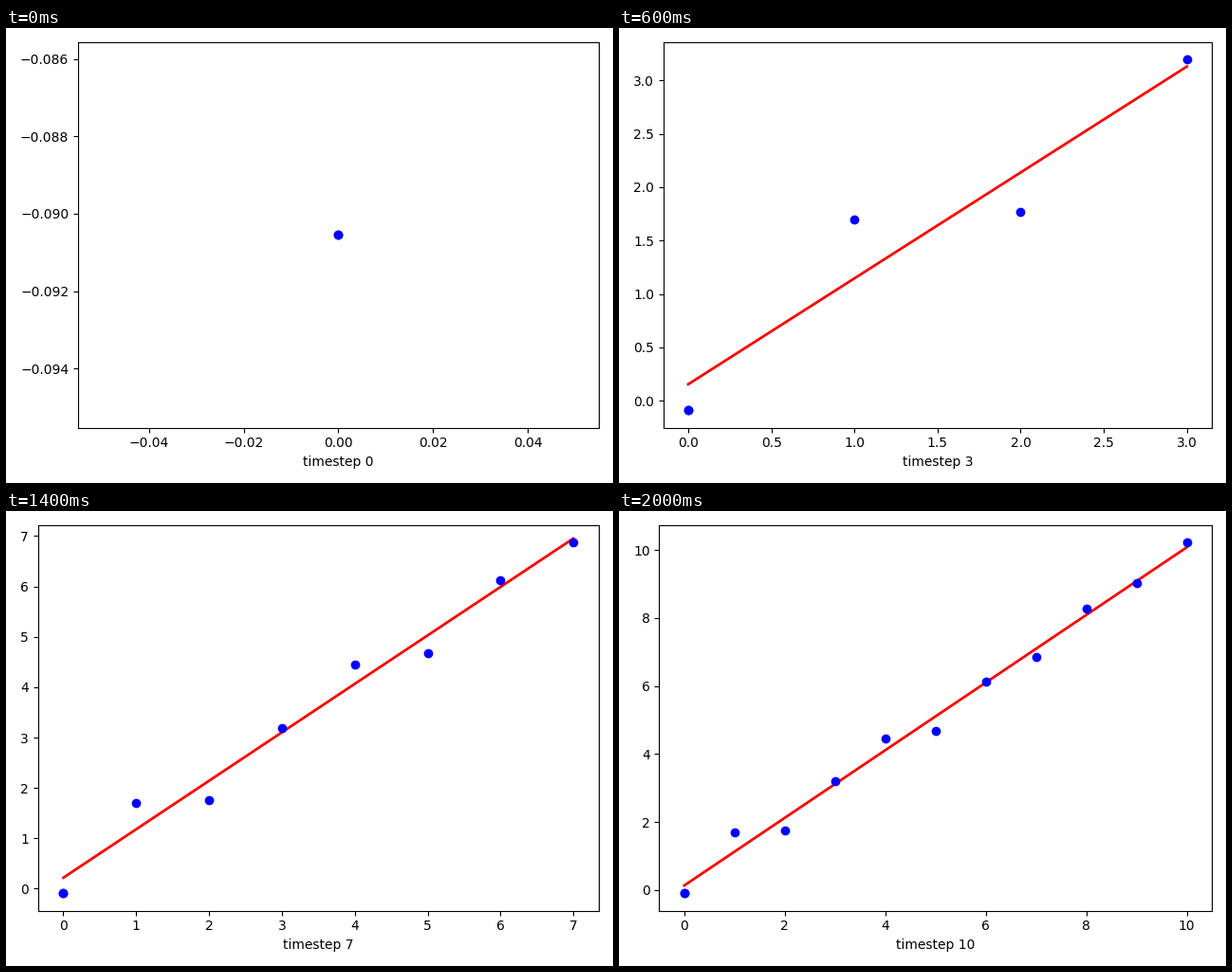
Recreate the animation shown at these times as a matplotlib script. Size 640 px wide and 480 px high, loop 2200 ms.

```python
import matplotlib.pyplot as plt
import numpy as np
from matplotlib.animation import FuncAnimation

# The plotted samples: one reading per step, scattered around y = x.
READINGS = [-0.09055, 1.697, 1.767, 3.195, 4.447, 4.672,
            6.124, 6.868, 8.265, 9.021, 10.213]

y = np.array(READINGS)
x = np.arange(len(y))

fig, ax = plt.subplots(figsize=(6.4, 4.8), dpi=100, layout="tight")


def update(step):
    ax.clear()
    xs, ys = x[:step + 1], y[:step + 1]

    # The first sample is stamped twice, which makes its edge a little firmer.
    ax.plot(np.r_[xs[0], xs], np.r_[ys[0], ys], "bo", zorder=3)

    # Only the samples set the view; the fitted line may run out of it.
    ax.autoscale_view()
    ax.autoscale(False)
    if step > 0:
        slope, offset = np.polyfit(xs, ys, 1)
        ax.plot(xs, slope * xs + offset, "r-", linewidth=2)

    ax.set_xlabel(f"timestep {step}")
    return ax.lines


anim = FuncAnimation(fig, update, frames=len(y), interval=200,
                     init_func=lambda: update(0), repeat=True, repeat_delay=0)
plt.show()
```
